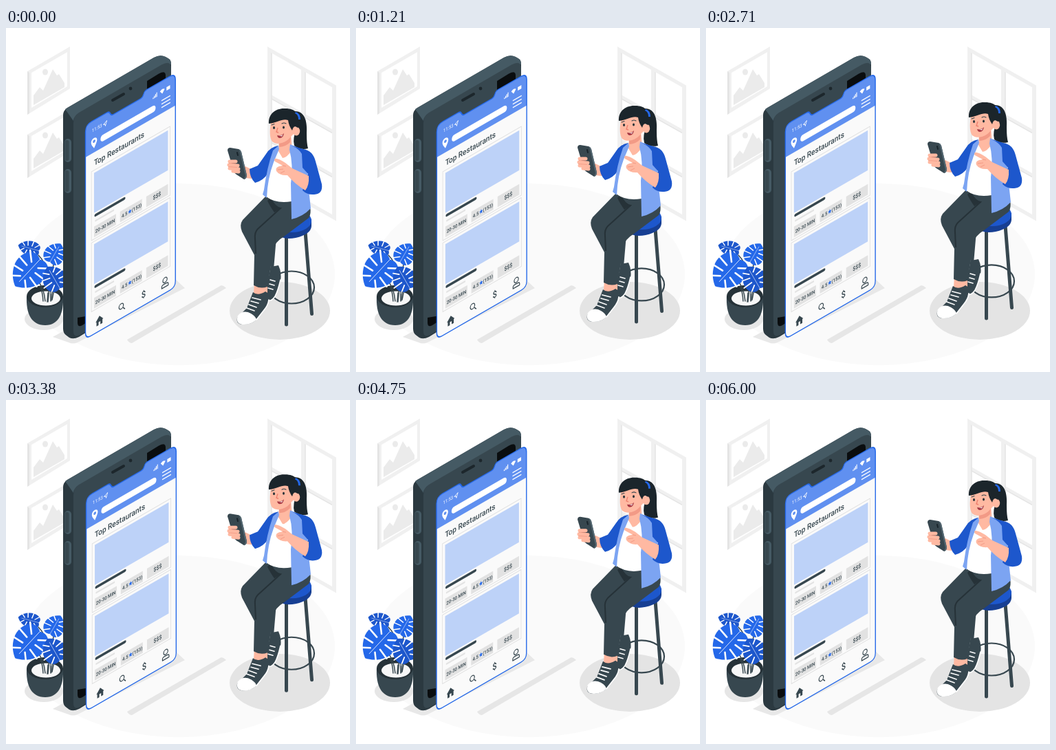
These frames come from a looping animation (500x500 px, 6040 ms). An HTML page:

```html
<!DOCTYPE html>
<html lang="en">
<head>
<meta charset="utf-8">
<title>Restaurant app</title>
<style>
  html, body { margin: 0; width: 100%; height: 100%; overflow: hidden; background: #fff; }
  svg { display: block; width: 100vw; height: 100vh; }
  text { font-family: Roboto, "Open Sans", sans-serif; font-weight: 500; fill: #37474f; }
  .blue { fill: #2468e9; }
  .deep { fill: #1d57cc; }
  .pale { fill: #7ca4f2; }
  .slate { fill: #37474f; }
  .ink { fill: #263238; }
  .skin { fill: #ffb9a2; }
  .white { fill: #fff; }
  .line { fill: none; stroke: #37474f; stroke-linecap: round; stroke-linejoin: round; }
  .wline { fill: none; stroke: #fff; stroke-linecap: round; stroke-linejoin: round; }
</style>
</head>
<body>
<svg viewBox="0 0 500 500">
  <defs>
    <path id="panel" d="M0,10Q0,0 10,0H36Q40,0 41.5,4T47,8H92Q96,8 97.500,4T103,0H141Q151,0 151,10V302Q151,311 142,311H9Q0,311 0,302Z"/>
    <clipPath id="inside"><use href="#panel"/></clipPath>
    <g id="leaf">
      <path d="M0,24C-20,34-32,10-23,-8C-17,-20-7,-26 0,-29C7,-26 17,-20 23,-8C32,10 20,34 0,24Z"/>
      <path class="wline" stroke-width="2.600" d="M-29,7L-9,5M-25,-8L-8,-5M-15,-21L-5,-13M-21,24L-7,13M29,7L9,5M25,-8L8,-5M15,-21L5,-13M21,24L7,13"/>
      <path class="wline" stroke-width=".8" d="M0,24V-20"/>
    </g>
    <g id="picture">
      <path fill="#f0f0f0" d="M31,63L93,27V88L31,126Z"/>
      <path fill="#e4e4e4" d="M31,63L34,65V124L31,126Z"/>
      <path class="white" d="M37,65L89,35V85L37,116Z"/>
      <path fill="#ebebeb" d="M40,112V98L49,86L54,91L68,60L74,69L77,67L85,80V86Z"/>
      <ellipse fill="#ebebeb" cx="57" cy="64" rx="4" ry="4.500"/>
    </g>
    <g id="card">
      <rect x="10" y="73" width="132" height="100" fill="#fafafa" stroke="#dedede" stroke-width=".9"/>
      <rect x="14.400" y="77" width="124" height="58" fill="#bdd2f8"/>
      <path class="line" stroke-width="4" d="M17,139.500H65"/>
      <path d="M16,147.500H48" stroke="#e3e3e3" stroke-width="2.500"/>
      <g fill="#e2e2e2">
        <rect x="14.400" y="155" width="37" height="15.500"/>
        <rect x="58" y="155" width="37" height="15.500"/>
        <rect x="102" y="155" width="36.500" height="15.500"/>
      </g>
      <g font-size="7" text-anchor="middle">
        <text x="33" y="165.500">20-30 MIN</text>
        <text x="65.500" y="165.500">4.5</text>
        <text x="86" y="165.500">(153)</text>
        <text x="120" y="165.500" font-size="8">$$$</text>
      </g>
      <path class="blue" d="M74.500,159.500l.9,2.200 2.300,.2-1.800,1.500 .6,2.300-2-1.300-2,1.300 .6-2.300-1.800-1.500 2.300-.2Z"/>
    </g>
  </defs>

  <!-- room -->
  <ellipse cx="251" cy="358" rx="227" ry="132" fill="#fafafa"/>
  <use href="#picture"/>
  <use href="#picture" y="92"/>
  <g transform="matrix(1 .565 0 1 380 27)" fill="none">
    <path stroke="#f0f0f0" stroke-width="6" d="M3,3H97V194H3ZM52,3V194M3,70H97M3,134H97"/>
    <path stroke="#e4e4e4" stroke-width="1.500" d="M6,6V191M55,6V191M6,72.500H94M6,136.500H94"/>
  </g>
  <path fill="#e6e6e6" d="M176,453L312,374.500Q315,373 320,378L183,458Q179,458 176,453Z"/>
  <ellipse cx="398" cy="411" rx="73" ry="42" fill="#e4e4e4"/>
  <ellipse cx="55" cy="423" rx="28" ry="16" fill="#e6e6e6"/>
  <path fill="#e8e8e8" d="M68,449L90,437L246,365L260,378L104,457Q97,460 91,457Z"/>

  <!-- plant -->
  <path class="slate" d="M30,390C29,414 36,432 57,432C77,432 84,414 83,390Z"/>
  <ellipse class="ink" cx="56.500" cy="390" rx="26.500" ry="16"/>
  <ellipse cx="58" cy="393" rx="21" ry="10.500" fill="#f7f7f7"/>
  <path class="line" stroke-width="1.500" d="M61,398Q67,350 47,330M57,397Q55,376 45,366M65,397Q63,365 70,340M67,395Q70,384 70,372"/>
  <use href="#leaf" class="blue" transform="translate(71 328) rotate(30) scale(.58)"/>
  <use href="#leaf" class="deep" transform="translate(34 320) rotate(-75) scale(.42 .58)"/>
  <use href="#leaf" class="blue" transform="translate(33 354) rotate(-137) scale(.93 1)"/>
  <use href="#leaf" class="deep" transform="translate(70 364) rotate(-30) scale(.68)"/>
  <path class="line" stroke-width="1.500" d="M54,397Q53,383 50,377M60,398L61,385M66,396L67,384"/>

  <!-- phone body -->
  <path fill="#2b3940" d="M83,127Q83,120 89,116L215,43Q224,38 232,42L237,45Q240,47 240,53V366L106,449Q98,453 92,450L88,447Q83,444 83,437Z"/>
  <path fill="#455a64" d="M86,118L215,43Q224,38 232,42L237,45Q240,47 240,53L228,54L106,124Q98,129 98,135Z"/>
  <path class="slate" d="M98,138Q98,128 106,123L226,53.500Q240,46 240,59V366L108,446Q98,451 98,441Z"/>
  <path fill="#0a0d0f" d="M205,77L222,66.500Q232,61 232,69V90H205ZM104,421V428Q104,436 111,432L122,425V418Z"/>
  <path d="M155,105L171,96" fill="none" stroke="#1d272c" stroke-width="4" stroke-linecap="round"/>
  <circle cx="181" cy="88" r="2.400" fill="#1d272c"/>
  <path d="M90,166V190M90,210V235" fill="none" stroke="#455a64" stroke-width="10" stroke-linecap="round"/>
  <path d="M88.500,166V190M88.500,210V235" fill="none" stroke="#37474f" stroke-width="6" stroke-linecap="round"/>

  <!-- floating screen -->
  <g id="screen">
    <g transform="matrix(.866 -.5 0 1 115.500 141)">
      <use href="#panel" fill="#fafafa"/>
      <rect width="151" height="47" fill="#6090f0" clip-path="url(#inside)"/>
      <use href="#panel" fill="none" stroke="#2468e9" stroke-width="1.600"/>
      <text x="11" y="16.500" font-size="6.800" style="fill:#fff;font-weight:400">11:53</text>
      <path class="wline" stroke-width=".9" d="M30,14.500L36,11.500L33.500,18L32.500,15Z"/>
      <path class="white" d="M113,17h1.300v2h-1.300ZM115,15.500h1.300v3.500h-1.300ZM117,14h1.300v5h-1.300ZM119,12.500h1.300v6.500h-1.300ZM125,14Q129,10.500 133,14L129,19ZM136,13h6v5h-6Z"/>
      <path class="white" fill-rule="evenodd" d="M14.500,41Q9.500,34 9.500,31A5,5 0 0 1 19.500,31Q19.500,34 14.500,41ZM14.500,28.700a2.200,2.200 0 1 0 .1,0Z"/>
      <path class="wline" stroke-width="9.500" d="M30,33.500H113"/>
      <path class="wline" stroke-width="1.300" d="M128,28.500H142M128,33.500H142M128,38.500H142"/>
      <text x="14.500" y="66.500" font-size="11.600">Top Restaurants</text>
      <use href="#card"/>
      <use href="#card" y="103.500"/>
      <path class="slate" d="M17,296L23.500,289L30,296H28.500V302H25V297.500H22V302H18.500V296Z"/>
      <g class="line" stroke-width="1.300">
        <circle cx="60" cy="293.500" r="3.800"/>
        <path d="M62.800,296.500L66,300M128,302V300Q128,297.500 131,297.500H136Q139,297.500 139,300V302Z"/>
        <circle cx="133.500" cy="292" r="3.600"/>
      </g>
      <text x="97.500" y="299.500" font-size="13" text-anchor="middle">$</text>
    </g>
  </g>

  <!-- woman on stool -->
  <g id="woman">
    <path class="line" stroke-width="5" d="M391,298L383,392M435,296L444.500,415.500"/>
    <ellipse class="line" cx="415" cy="377" rx="33" ry="23.500" stroke-width="2.200"/>
    <path class="line" stroke-width="5" d="M407.500,300V431"/>
    <path fill="#173f93" d="M388,278H444V288Q443,300 421,305Q402,309 391,298Z"/>
    <ellipse class="deep" cx="416" cy="280" rx="28" ry="17"/>

    <path class="slate" d="M385,347L396,345Q401,356 399,368L393,386Q388,398 379,396L376,388Z"/>
    <path class="wline" stroke-width="1.600" d="M384,366L391,368M383,372L390,374M381,378L388,380M399,366Q395,383 391,390Q386,398 379,396"/>
    <path class="skin" d="M361,370H380V387Q370,393 360,386Z"/>
    <path class="slate" d="M359,384Q366,390 377,383L382,386Q384,398 377,407L365,423Q356,432 343,431Q334,430 336,421L350,407Z"/>
    <path class="white" d="M337,418Q345,409 356,415Q363,419 364,424Q356,432 343,431Q333,429 337,418Z"/>
    <path class="wline" stroke-width="1.700" d="M358,392L370,395M356,397L367,400M353,402L364,406M350,407L361,411M382,395Q381,403 375,410L364,424"/>

    <path class="slate" d="M379,243L344,279Q339,286 343,296L361,330L360,374Q370,380 380,376L389,321Q391,311 404,303L440,276Q444,270 442,260L414,250Z"/>
    <path fill="none" stroke="#263238" stroke-width="2" d="M384,247Q391,261 399,262L366,292Q361,297 362,306L363,328"/>
    <path class="ink" d="M384,247Q390,259 399,262L390,268Q383,258 380,251Z"/>

    <path d="M420,121C436,121 438,139 437,154Q437,168 439,175Q428,178 419,171Q416,160 423,145Z" fill="#1b252b"/>
    <path class="white" d="M391,182L397,176H413L417,190L415,252Q393,256 378,245L383,213Z"/>
    <path class="skin" d="M397,160L414,153L416,177Q408,189 402,189L396,179Z"/>
    <path fill="#f29a86" d="M397,167Q406,167 414,158L413,166Q406,173 397,173Z"/>
    <path class="skin" d="M385,137C383,150 383,160 387,165C393,170 402,168 409,163L421,151L419,130L390,128Z"/>
    <ellipse class="skin" cx="422" cy="150" rx="5.200" ry="6.500"/>
    <path d="M382,139C381,125 392,116 406,117C420,117 429,125 428,141L424,145Q418,140 416,149Q411,142 410,134C402,131 394,138 382,139Z" fill="#1b252b"/>
    <path class="blue" d="M421,122Q428,124 428,133L425,133Q425,126 420,124Z"/>
    <g class="ink">
      <ellipse cx="389.500" cy="145" rx="1.500" ry="2"/>
      <ellipse cx="403.500" cy="144.500" rx="1.500" ry="2"/>
    </g>
    <path class="line" stroke-width="1.100" d="M386,141L390,139.500M401,139Q404,137 407,139"/>
    <path fill="none" stroke="#ee806f" stroke-width="1.400" d="M395,145L393,151L396,152"/>
    <path fill="#a73843" d="M394,156Q400,157 404,153Q403,160 398,160Q395,160 394,156Z"/>
    <path class="white" d="M396,156.500Q400,157 402.500,155L401,157.500Z"/>

    <path class="skin" d="M337,196Q348,201 356,205L360,219Q347,220 335,211Z"/>
    <path class="deep" d="M396,171Q384,173 378,183L366,200L354,205Q354,217 362,225Q374,222 381,211L391,185Z"/>
    <path class="pale" d="M396,171L388,178Q379,204 375,235L373,242L379,247Q380,219 389,195L397,176Z"/>
    <path class="slate" d="M322,178Q322,174 326,174L338,176Q341,177 342,180L350,214Q350,219 346,220L335,213Q332,211 331,208Z"/>
    <path fill="#546872" d="M338,176Q341,177 342,180L350,214Q350,219 346,220L348,215L340,180Z"/>
    <path class="line" style="stroke:#18232a" stroke-width="2" d="M336,181L337,185"/>
    <path fill="none" stroke="#ffb9a2" stroke-width="5" stroke-linecap="round" d="M325,194L334,194M324,199L337,200M325,204L338,205M330,208L338,209"/>
    <path fill="none" stroke="#ef947f" stroke-width=".7" d="M324,196.500L334,197M323,201.500L336,202.500"/>

    <path class="pale" d="M413,169L431,177Q440,205 440,235L443,262Q432,274 415,278L414,226Q418,199 412,177Z"/>
    <path class="deep" d="M416,171L432,176Q446,178 450,194L459,227Q461,241 448,242Q438,243 431,236L439,212L431,203L430,183Q426,176 416,171Z"/>
    <path class="skin" d="M391,190Q395,189 406,196L416,204L440,215Q441,229 435,236Q420,227 409,214Q398,215 393,208Q391,203 397,201L402,200L391,194Q389,191 391,190Z"/>
    <path fill="none" stroke="#ef947f" stroke-width=".8" d="M402,200L407,201M395,206L403,205M399,211L405,208"/>
  </g>
</svg>
<script>
  const LOOP = 6040, CYCLE = 6000;
  const SHAKE = [0, -1, 2, -4, 4, -4, 4, -4, 2, -1, 0];
  const screenPart = document.getElementById('screen');
  const woman = document.getElementById('woman');

  // Linear interpolation through evenly spaced values
  function along(values, p) {
    const pos = p * (values.length - 1);
    const i = Math.min(Math.floor(pos), values.length - 2);
    return values[i] + (values[i + 1] - values[i]) * (pos - i);
  }

  function draw() {
    const p = Math.min(performance.now() % LOOP / CYCLE, 1);
    screenPart.setAttribute('transform', `translate(${along(SHAKE, p)} 0)`);
    woman.setAttribute('transform', `translate(0 ${along([0, -10, 0], p)})`);
    requestAnimationFrame(draw);
  }
  draw();
</script>
</body>
</html>
```
